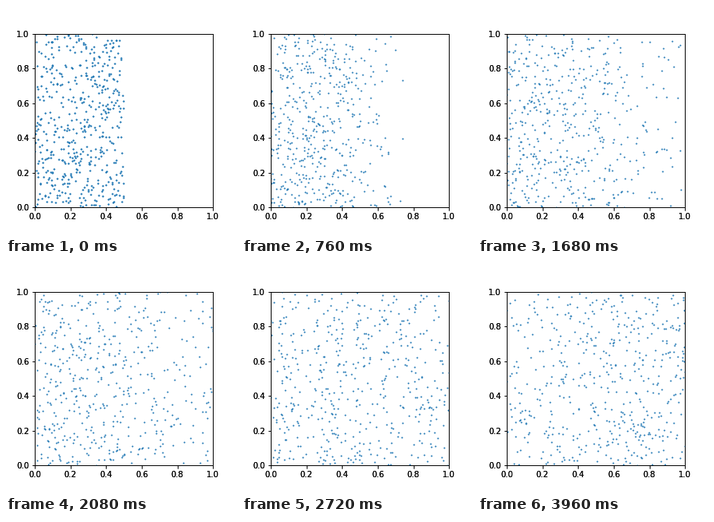
A matplotlib script that plays this animation: 288x288 px, repeating every 4 s.

```python
import matplotlib.pyplot as plt
import numpy as np
from matplotlib.animation import FuncAnimation

FRAMES, STEP_MS = 100, 40
COUNT = 500
VMAX = 0.0135  # largest step per frame along each axis

plt.rcParams.update({"font.family": "DejaVu Sans", "font.size": 10})

rng = np.random.default_rng(7)
start = rng.random((2, COUNT)) * [[0.5], [1.0]]
vel = rng.uniform(-VMAX, VMAX, (2, COUNT))


def gas(n):
    """Positions after n steps in a unit box with reflecting walls."""
    p = (start + n * vel) % 2
    return np.where(p > 1, 2 - p, p)


def unit_axes(fig):
    ax = fig.add_axes([0.125, 0.125, 0.775, 0.755])
    ax.set(xlim=(0, 1), ylim=(0, 1))
    ax.patch.set_visible(False)
    dots, = ax.plot([], [], "o", ms=1, color="C0")
    return dots


fig = plt.figure(figsize=(4, 4), dpi=72, facecolor="white")
# Two stacked axes give the heavy tick labels and the stronger opening dots.
under, dots = unit_axes(fig), unit_axes(fig)


def draw(n):
    dots.set_data(*gas(n))
    under.set_data(*gas(0))
    under.set_visible(n == 0)
    return under, dots


anim = FuncAnimation(fig, draw, frames=FRAMES, init_func=lambda: draw(0),
                     interval=STEP_MS, repeat=True, repeat_delay=0, blit=False)
plt.show()
```
